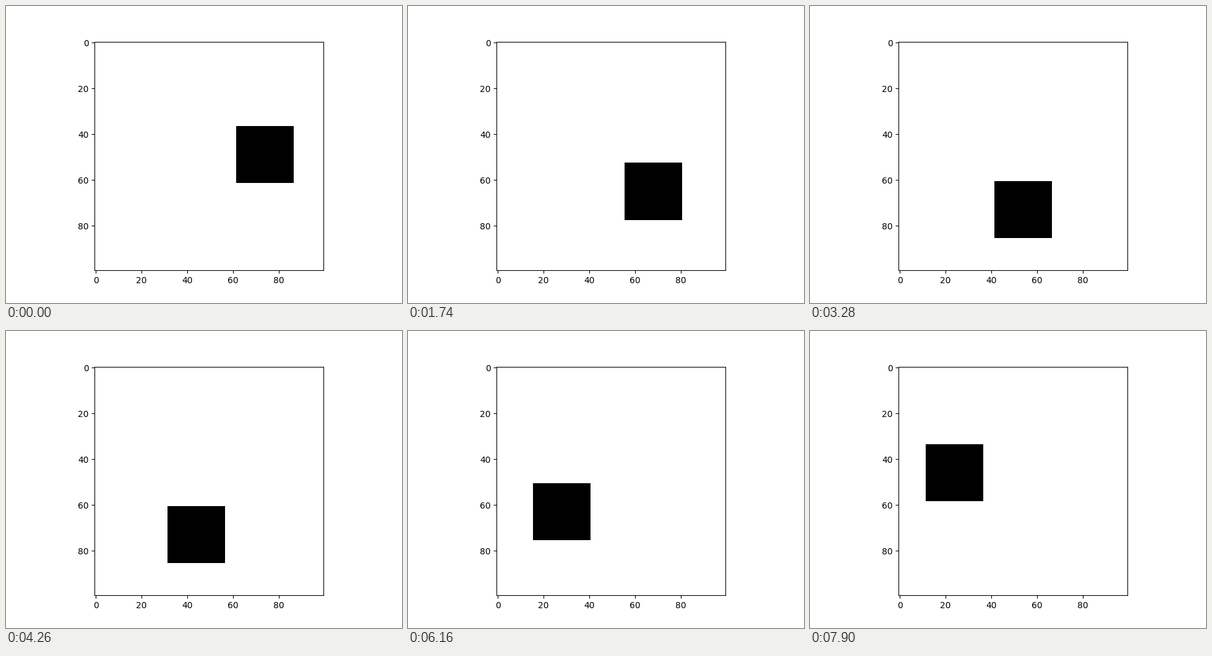
Write a matplotlib script that moves like this. It is 640 px wide and 480 px high and loops after 8 s.

```python
from itertools import groupby

import matplotlib.pyplot as plt
import numpy as np
from matplotlib.animation import FuncAnimation

GRID = 100
SIDE = 25
RADIUS = 25
LOOP_MS = 8000
TICK_MS = 10


def corner(angle):
    """Top-left cell of the square on its circular path."""
    mid = (GRID - SIDE) // 2
    return (int(mid + RADIUS * np.cos(angle)),
            int(mid + RADIUS * np.sin(angle)))


def build_schedule():
    """Each distinct position with its start time; long holds get 10 ms more."""
    starts, corners, now = [], [], 0
    for pos, run in groupby(corner(a) for a in np.linspace(0, 2 * np.pi, 500)):
        count = len(list(run))
        starts.append(now)
        corners.append(pos)
        now += 30 * count + (10 if count >= 4 else 0)
    return starts, corners


def picture(pos):
    x, y = pos
    cells = np.ones((GRID, GRID))
    cells[y:y + SIDE, x:x + SIDE] = 0
    return cells


starts, corners = build_schedule()

fig, ax = plt.subplots(figsize=(6.4, 4.8), dpi=100)
image = ax.imshow(picture(corners[0]), cmap="gray", vmin=0, vmax=1)


def update(tick):
    index = np.searchsorted(starts, tick * TICK_MS, side="right") - 1
    image.set_data(picture(corners[index]))
    return [image]


anim = FuncAnimation(fig, update, frames=LOOP_MS // TICK_MS, interval=TICK_MS,
                     repeat=True, repeat_delay=0, blit=False)
plt.show()
```
